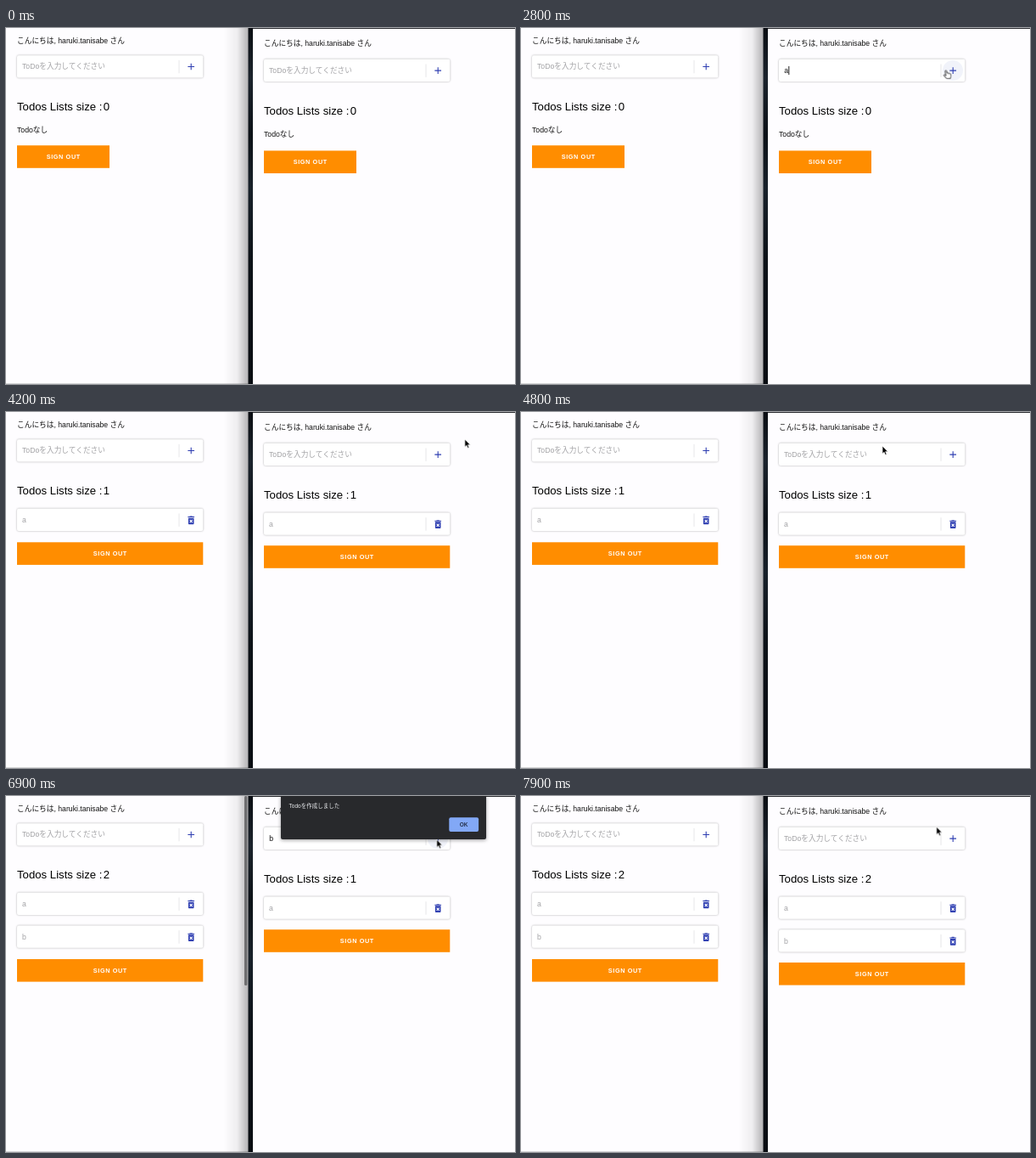
An HTML page for the animation above (8 s loop, 600 px wide and 419 px high).

```html
<!DOCTYPE html>
<html lang="ja">
<head>
<meta charset="utf-8">
<title>Todo sync</title>
<style>
html, body { margin: 0; width: 100%; height: 100%; overflow: hidden; background: #fefdff; }
svg { display: block; width: 600px; height: 419px; }
text { font: 8.7px "Liberation Sans", "Noto Sans CJK JP", "Noto Sans CJK", sans-serif; fill: #111; white-space: pre; }
.title { font-size: 13.2px; fill: #000; }
.hint { fill: #a2a2a5; }
.btn { font-size: 7.3px; font-weight: bold; letter-spacing: .6px; fill: #fff; text-anchor: middle; }
.orange { fill: #ff8d00; }
.icon { fill: #3040b2; }
.card { fill: #fff; filter: drop-shadow(0 .6px .8px rgba(0,0,0,.32)); }
.msg { font-size: 6.5px; fill: #e8eaed; }
.ok { font-size: 6.5px; font-weight: bold; fill: #26324c; text-anchor: middle; }
.sheet { fill: #28292c; filter: drop-shadow(0 1px 2px rgba(0,0,0,.4)); }

/* every state shares one 8 s clock; 1.25% is 100 ms */
[class^="t-"] { animation: 8s step-end infinite; }
.t-l0 { animation-name: l0; }
.t-l1 { animation-name: l1; }
.t-l2 { animation-name: l2; }
.t-lAny { animation-name: lAny; }
.t-r0 { animation-name: r0; }
.t-r1 { animation-name: r1; }
.t-r2 { animation-name: r2; }
.t-rAny { animation-name: rAny; }
.t-empty { animation-name: empty; }
.t-a { animation-name: typedA; }
.t-b { animation-name: typedB; }
.t-caret { animation-name: caret; }
.t-hover { animation-name: hover; }
.t-alert { animation-name: alert; }
.t-okHover { animation-name: okHover; }
.t-bar { animation-name: bar; animation-timing-function: linear; }
.t-move { animation-name: move; animation-timing-function: linear; }
.t-seen { animation-name: seen; }
.t-arrow { animation-name: arrow; }
.t-beam { animation-name: beam; }
.t-hand { animation-name: hand; }

@keyframes l0 { 0% { opacity: 1 } 40%, 100% { opacity: 0 } }
@keyframes l1 { 0%, 85%, 100% { opacity: 0 } 40% { opacity: 1 } }
@keyframes l2 { 0% { opacity: 0 } 85%, 100% { opacity: 1 } }
@keyframes lAny { 0% { opacity: 0 } 40%, 100% { opacity: 1 } }
@keyframes r0 { 0% { opacity: 1 } 51.25%, 100% { opacity: 0 } }
@keyframes r1 { 0%, 96.25%, 100% { opacity: 0 } 51.25% { opacity: 1 } }
@keyframes r2 { 0% { opacity: 0 } 96.25%, 100% { opacity: 1 } }
@keyframes rAny { 0% { opacity: 0 } 51.25%, 100% { opacity: 1 } }
@keyframes empty { 0%, 51.25%, 96.25%, 100% { opacity: 1 } 20%, 65% { opacity: 0 } }
@keyframes typedA { 0%, 51.25%, 100% { opacity: 0 } 20% { opacity: 1 } }
@keyframes typedB { 0%, 96.25%, 100% { opacity: 0 } 65% { opacity: 1 } }
@keyframes caret {
  0%, 16.25%, 26.25%, 38.75%, 71.25%, 83.75%, 100% { opacity: 0; transform: none }
  10%, 61.25% { opacity: 1; transform: none }
  20%, 32.5%, 65%, 77.5% { opacity: 1; transform: translateX(5.3px) }
}
@keyframes hover { 0%, 41.25%, 96.25%, 100% { opacity: 0 } 33.75%, 81.25% { opacity: 1 } }
@keyframes alert { 0%, 51.25%, 96.25%, 100% { opacity: 0 } 41.25%, 86.25% { opacity: 1 } }
@keyframes okHover { 0%, 51.25%, 100% { opacity: 0 } 47.5%, 91.25% { opacity: 1 } }
@keyframes bar {
  0%, 39.99% { opacity: 0; height: 181px }
  40%, 46.25% { opacity: 1; height: 181px }
  49%, 84.99% { opacity: 0; height: 181px }
  85%, 88.75% { opacity: 1; height: 223px }
  91.25%, 100% { opacity: 0; height: 223px }
}
@keyframes move {
  0%, 3.75% { transform: translate(368px, 197px) }
  10% { transform: translate(337px, 54px) }
  12.5%, 23.75% { transform: translate(345px, 50px) }
  30%, 32.5% { transform: translate(486px, 50px) }
  35%, 43.75% { transform: translate(500.5px, 49.3px) }
  48.75%, 52.5% { transform: translate(541px, 32px) }
  58.75%, 68.75% { transform: translate(426px, 40px) }
  75% { transform: translate(472px, 44px) }
  82.5%, 87.5% { transform: translate(507.7px, 51.3px) }
  92.5%, 97.5% { transform: translate(546.3px, 27.3px) }
  98.75%, 100% { transform: translate(489.7px, 36.3px) }
}
@keyframes seen { 0%, 20%, 65% { opacity: 0 } 3.75%, 23.75%, 68.75%, 100% { opacity: 1 } }
@keyframes arrow { 0%, 41.25%, 100% { opacity: 1 } 10% { opacity: 0 } }
@keyframes beam { 0%, 32.5%, 100% { opacity: 0 } 10% { opacity: 1 } }
@keyframes hand { 0%, 41.25%, 100% { opacity: 0 } 32.5% { opacity: 1 } }
</style>
</head>
<body>
<svg viewBox="0 0 600 419">
  <defs>
    <linearGradient id="shade">
      <stop offset="0" stop-color="#000" stop-opacity="0"/>
      <stop offset=".55" stop-color="#000" stop-opacity=".06"/>
      <stop offset="1" stop-color="#000" stop-opacity=".3"/>
    </linearGradient>
    <linearGradient id="desk" x2="0" y2="1">
      <stop offset="0" stop-color="#0b0e13"/>
      <stop offset=".14" stop-color="#1b232c"/>
      <stop offset=".3" stop-color="#0c1117"/>
      <stop offset=".45" stop-color="#18212a"/>
      <stop offset=".65" stop-color="#0d1218"/>
      <stop offset="1" stop-color="#0a0d12"/>
    </linearGradient>

    <text id="hello" x="13">こんにちは, haruki.tanisabe さん</text>
    <text id="hint" class="hint" x="19" y="16">ToDoを入力してください</text>
    <text id="size" class="title" x="13">Todos Lists size :</text>
    <text id="none" x="13">Todoなし</text>

    <g id="card">
      <rect class="card" x="13" width="219.3" height="26.3" rx="2"/>
      <path d="M204 5.7v15.4" stroke="#e0e0e2" stroke-width=".8"/>
    </g>
    <g id="entry">
      <use href="#card"/>
      <path class="icon" transform="translate(211.6 6.7) scale(.55)" d="M19 13h-6v6h-2v-6H5v-2h6V5h2v6h6v2z"/>
    </g>
    <g id="item">
      <use href="#card"/>
      <path class="icon" transform="translate(211.6 7) scale(.55)" d="M6 19c0 1.1.9 2 2 2h8c1.1 0 2-.9 2-2V7H6v12zm2.46-7.12l1.41-1.41L12 12.59l2.12-2.12 1.41 1.41L13.41 14l2.12 2.12-1.41 1.41L12 15.41l-2.12 2.12-1.41-1.41L10.59 14l-2.13-2.12zM15.5 4l-1-1h-5l-1 1H5v2h14V4z"/>
    </g>
    <g id="itemA"><use href="#item"/><text class="hint" x="19" y="16.4">a</text></g>
    <g id="itemB"><use href="#item"/><text class="hint" x="19" y="16.4">b</text></g>

    <g id="outSmall">
      <rect class="orange" x="13" width="109" height="26.6"/>
      <text class="btn" x="67.8" y="16">SIGN OUT</text>
    </g>
    <g id="outWide">
      <rect class="orange" x="13" width="219.3" height="26.6"/>
      <text class="btn" x="122.9" y="16">SIGN OUT</text>
    </g>
    <text id="n0" class="title" x="114.8">0</text>
    <text id="n1" class="title" x="114.8">1</text>
    <text id="n2" class="title" x="114.8">2</text>
  </defs>

  <rect width="600" height="419" fill="#fefdff"/>

  <!-- left window -->
  <use href="#hello" y="17.6"/>
  <use href="#entry" y="32.2"/>
  <use href="#hint" y="32.2"/>
  <use href="#size" y="97"/>
  <g class="t-l0">
    <use href="#n0" y="97"/>
    <use href="#none" y="123"/>
    <use href="#outSmall" y="138.2"/>
  </g>
  <g class="t-lAny"><use href="#itemA" y="113.8"/></g>
  <g class="t-l1">
    <use href="#n1" y="97"/>
    <use href="#outWide" y="153.3"/>
  </g>
  <g class="t-l2">
    <use href="#n2" y="97"/>
    <use href="#itemB" y="152.5"/>
    <use href="#outWide" y="192"/>
  </g>
  <rect y="418" width="286" height="1" fill="#d5d5d7"/>
  <rect x="256" width="30" height="419" fill="url(#shade)"/>
  <rect class="t-bar" x="281" width="3.4" height="181" rx="1.6" fill="#6e6e70"/>

  <!-- gap between the windows -->
  <rect x="285.5" width="5.5" height="419" fill="url(#desk)"/>
  <rect x="291" width="309" height="1" fill="#2c2d31"/>

  <!-- right window -->
  <g transform="translate(291)">
    <use href="#hello" y="20.8"/>
    <use href="#entry" y="36.8"/>
    <circle class="t-hover" cx="218" cy="50" r="12" fill="#3f51b5" fill-opacity=".07"/>
    <g class="t-empty"><use href="#hint" y="37"/></g>
    <text class="t-a" x="19.2" y="53">a</text>
    <text class="t-b" x="19.2" y="53">b</text>
    <rect class="t-caret" x="19" y="45" width="1" height="10" fill="#222"/>
    <use href="#size" y="102"/>
    <g class="t-r0">
      <use href="#n0" y="102"/>
      <use href="#none" y="128.4"/>
      <use href="#outSmall" y="144.4"/>
    </g>
    <g class="t-rAny"><use href="#itemA" y="118.5"/></g>
    <g class="t-r1">
      <use href="#n1" y="102"/>
      <use href="#outWide" y="157.2"/>
    </g>
    <g class="t-r2">
      <use href="#n2" y="102"/>
      <use href="#itemB" y="157.2"/>
      <use href="#outWide" y="196"/>
    </g>
  </g>

  <!-- alert -->
  <g class="t-alert">
    <path class="sheet" d="M324 0h242v49q0 2-2 2h-238q-2 0-2-2z"/>
    <text class="msg" x="333.6" y="13.8">Todoを作成しました</text>
    <rect x="522.3" y="25.3" width="34.8" height="16.8" rx="2" fill="#82a8f6"/>
    <rect class="t-okHover" x="522.3" y="25.3" width="34.8" height="16.8" rx="2" fill="#1a3a90" fill-opacity=".08"/>
    <text class="ok" x="539.6" y="36">OK</text>
  </g>

  <!-- pointer -->
  <g class="t-move">
    <g class="t-seen">
      <path class="t-arrow" d="M0 0V9.2L2.1 7.3 3.5 10.5 5.1 9.8 3.7 6.7H6.5Z" fill="#000" stroke="#fff" stroke-width=".7"/>
      <path class="t-beam" d="M-1.6-5Q0-5 0-4Q0-5 1.6-5M0-4V4M-1.6 5Q0 5 0 4Q0 5 1.6 5" fill="none" stroke="#222" stroke-width=".8"/>
      <path class="t-hand" d="M-.6 1.2Q.3.1 1.2 1.2L2 4Q3 3.4 3.7 4.3 4.7 3.8 5.2 4.7 6.4 4.5 6.5 5.7V7.8L5.6 10.3H1.2L-2.3 6.4Q-1.9 5.2-.6 6.2L.4 6.9Z" fill="#fff" stroke="#111" stroke-width=".85" stroke-linejoin="round"/>
    </g>
  </g>
</svg>
</body>
</html>
```
